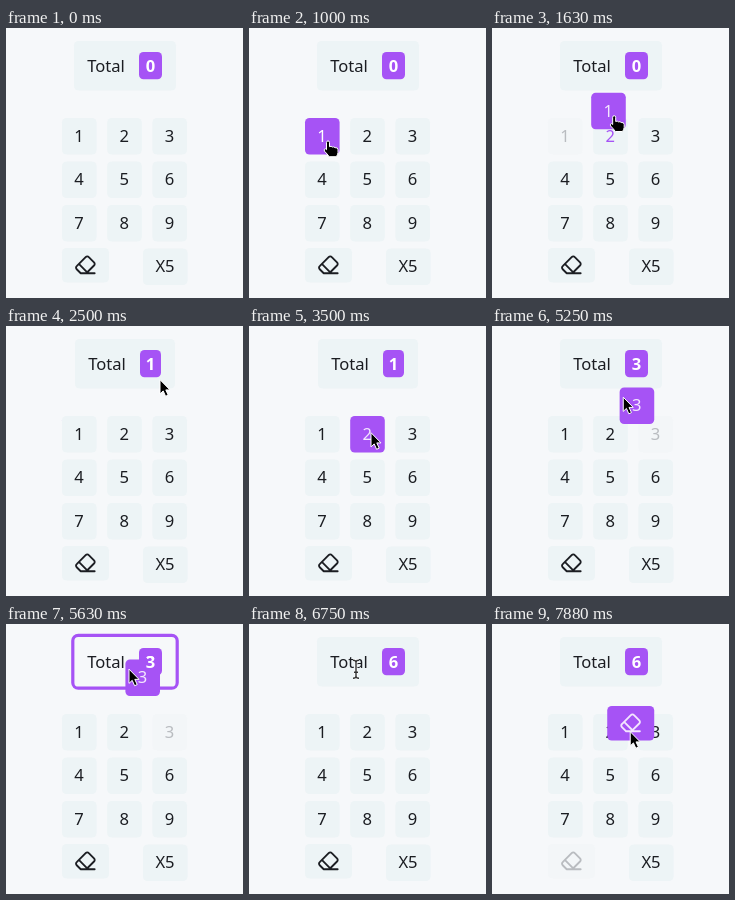
Animation of 237x270 px, one loop 8 s. Source, as an HTML page:

```html
<!DOCTYPE html>
<html lang="en">
<head>
<meta charset="utf-8">
<title>Drag and drop adder</title>
<style>
  html, body { margin: 0; width: 100%; height: 100%; overflow: hidden; background: #f6f8fa; }
  svg { display: block; width: 100vw; height: 100vh; }
  text { font: 500 16.6px "Noto Sans", "Open Sans", sans-serif; text-anchor: middle; }
  .badge { font-weight: 700; }
</style>
</head>
<body>
<svg id="stage" viewBox="0 0 237 270"></svg>
<script>
const LOOP = 8000, STEP = 125;
const BG = '#f6f8fa', CELL = '#edf4f6', INK = '#1b1d22', PURPLE = '#a653f5';
const ERASER = 9;
const stage = document.getElementById('stage');
const panel = { x: 68, y: 13, w: 102, h: 49.5 };
const word = { x: 80, y: 30, w: 40, h: 20 };

const cells = [];
for (let i = 0; i < 9; i++) {
  cells.push({ label: i + 1, x: 56 + (i % 3) * 45.2, y: 90 + Math.floor(i / 3) * 43.5, w: 34.6, h: 36.5 });
}
cells.push({ label: 'eraser', x: 56, y: 220, w: 47, h: 34.5 });
cells.push({ label: 'X5', x: 137, y: 220.5, w: 44.6, h: 36.5 });

// Pointer moves; those with a cell drag that cell into the panel
const moves = [
  { start: 125, end: 750, x: 79, y: 113 },
  { start: 1250, end: 2125, x: 152, y: 49, cell: 0 },
  { start: 2125, end: 2500, x: 154, y: 53 },
  { start: 2875, end: 3375, x: 122, y: 106 },
  { start: 3500, end: 4250, x: 128, y: 44, cell: 1 },
  { start: 4375, end: 4625, x: 150, y: 99 },
  { start: 4750, end: 5750, x: 122, y: 42, cell: 2 },
  { start: 5875, end: 6500, x: 107, y: 46 },
  { start: 6750, end: 7375, x: 79, y: 245 },
  { start: 7500, end: 8125, x: 156, y: 32, cell: ERASER }
];
moves.reduce((from, m) => (m.from = from, m), { x: 53, y: 140 });

const mix = (a, b, p) => a + (b - a) * p;

// Fast start sideways, soft start and stop vertically: a slightly curved path
function pointerAt(t) {
  const m = moves.findLast(m => t >= m.start);
  const p = Math.min(1, (t - m.start) / (m.end - m.start));
  return [mix(m.from.x, m.x, 1 - (1 - p) ** 1.6), mix(m.from.y, m.y, p * p * (3 - 2 * p))];
}

const inside = (x, y, b, pad = 0) =>
  x >= b.x && x <= b.x + b.w && y >= b.y - pad && y <= b.y + b.h + pad;

const rect = (x, y, w, h, r, fill, extra = '') =>
  `<rect x="${x}" y="${y}" width="${w}" height="${h}" rx="${r}" fill="${fill}" ${extra}/>`;

const text = (s, x, y, fill, cls = '') =>
  `<text x="${x}" y="${y}" fill="${fill}" class="${cls}">${s}</text>`;

const eraser = (x, y, color) =>
  `<path transform="translate(${x + 12.2} ${y + 5.7}) scale(.93)" fill="none" stroke="${color}" stroke-width="2"
    stroke-linecap="round" stroke-linejoin="round" d="m7 21-4.3-4.3c-1-1-1-2.5 0-3.4l9.6-9.6c1-1 2.5-1 3.4 0l5.6 5.6c1 1 1 2.5 0 3.4L13 21M22 21H7M5 11l9 9"/>`;

function button({ label, x, y, w, h }, fill, ink) {
  const face = label === 'eraser' ? eraser(x, y, ink) : text(label, x + w / 2 - .3, y + 23.9, ink);
  return rect(x, y, w, h, 4.5, fill) + face;
}

const line = (d, color, width) => `<path d="${d}" fill="none" stroke="${color}" stroke-width="${width}"/>`;
const solid = d => `<path d="${d}" fill="#000" stroke="#fff"/>`;
const BEAM = 'M-3-10.5Q0-10.5 0-8.5Q0-10.5 3-10.5M0-9V6M-3 7.5Q0 7.5 0 5.5Q0 7.5 3 7.5M-2 1.5H2';
const cursors = {
  arrow: solid('M0 0V14.2L3.2 11.2L5.6 16.6L8.2 15.4L5.8 10.2H10Z'),
  hand: solid('M-1.5 8V.8Q-1.5-.8 0-.8T1.5 .8V5Q3.2 4 4.3 5.4Q6 4.6 7 6Q9.8 5.4 10 8V11Q9.6 13 8.4 15H1.2Q-.6 12.4-3.6 9.4Q-4.4 7.2-2.6 7.1Z'),
  beam: line(BEAM, '#fff', 2.8) + line(BEAM, '#333', 1.4)
};

const badgeDigit = total => text(total, 144.5, 44.4, '#fff', 'badge');

function totalPanel(total, active) {
  const inset = total === 1 ? 1 : 0;
  const { y, h } = panel, x = panel.x + inset, w = panel.w - 2 * inset;
  const box = active
    ? rect(x - 1.2, y - 1.7, w + 2.4, h + 3.4, 5.5, BG, `stroke="${PURPLE}" stroke-width="3.2"`)
    : rect(x, y, w, h, 4.5, CELL);
  return box + text('Total', 100 + inset, 44.3, INK) +
    rect(133 + inset, 24, 23 - 2 * inset, 27.2, 4.5, PURPLE) + badgeDigit(total);
}

function scene(t) {
  const drag = moves.find(m => 'cell' in m && t >= m.start && t < m.end);
  const total = moves.reduce((sum, m) => 'cell' in m && t >= m.end ? sum + cells[m.cell].label : sum, 0);
  const shown = t >= moves[0].start;
  const [px, py] = shown ? pointerAt(t) : [-50, -50];
  const over = drag && inside(px, py, panel);
  const firstDrag = drag && drag.cell === 0;
  let cursor = firstDrag ? 'hand' : !drag && inside(px, py, word) ? 'beam' : 'arrow';

  let out = totalPanel(total, over);
  cells.forEach((c, i) => {
    let fill = CELL, ink = INK;
    if (drag && drag.cell === i) {
      fill = '#f3f6f8';
      ink = '#b9bcc0';
    } else if (firstDrag && inside(px, py, c, 3)) {
      ink = PURPLE;
    } else if (!drag && inside(px, py, c)) {
      fill = PURPLE;
      ink = '#fff';
      cursor = 'hand';
    }
    out += button(c, fill, ink);
  });
  if (drag) {
    const c = cells[drag.cell];
    const ghost = { ...c, x: c.x + px - drag.from.x, y: c.y + py - drag.from.y };
    out += button(ghost, PURPLE, '#f3e6fe');
    // The badge digit stays readable above the dragged tile
    if (over) out += badgeDigit(total);
  }
  if (shown) out += `<g transform="translate(${px} ${py + .7})">${cursors[cursor]}</g>`;
  return out;
}

let last = -1;
function tick() {
  const t = Math.floor((performance.now() % LOOP) / STEP) * STEP;
  if (t !== last) stage.innerHTML = scene(last = t);
  requestAnimationFrame(tick);
}
tick();
</script>
</body>
</html>
```
